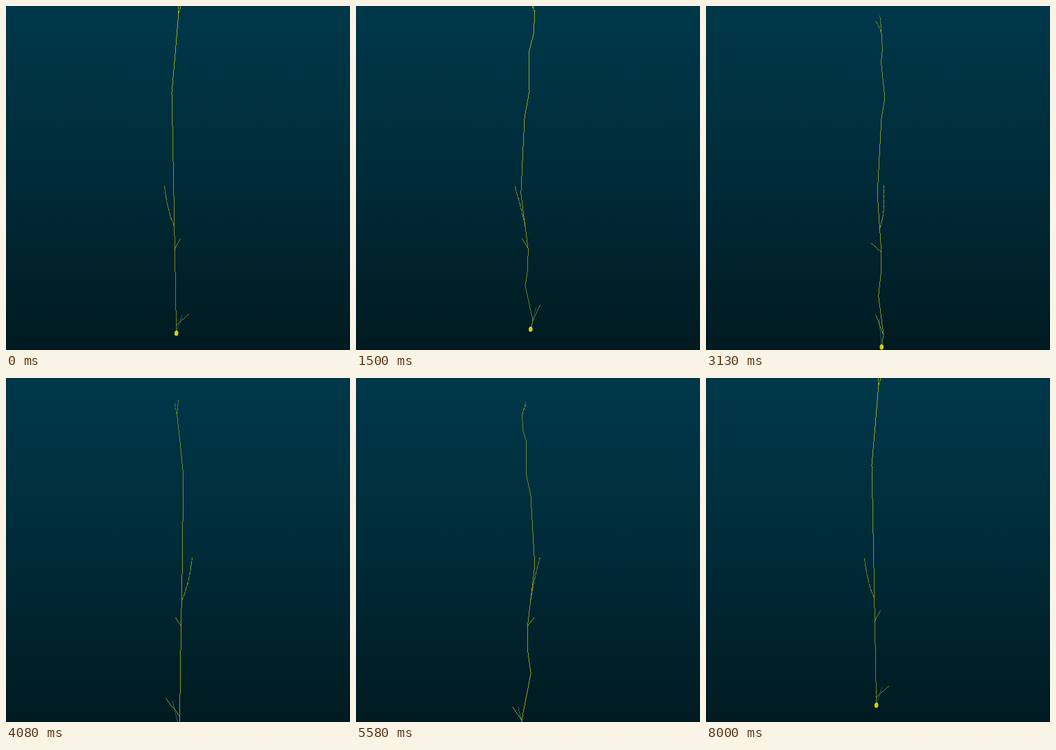
Animation, 500 px wide and 500 px high, one loop 8.04 s. Source, as an HTML page with a canvas:

```html
<!DOCTYPE html>
<html lang="en">
<head>
<meta charset="utf-8">
<title>Rotating neuron</title>
<style>
html, body { margin: 0; width: 100%; height: 100%; overflow: hidden; background: #00202a; }
canvas { display: block; width: 500px; height: 500px; }
</style>
</head>
<body>
<canvas id="stage" width="500" height="500"></canvas>
<script>
const ctx = document.getElementById('stage').getContext('2d');
const LOOP = 8040, STEPS = 192, STEP_MS = 1000 / 24;
const CX = 249.3, CY = 250, DEPTH = 0.002, CROWN = -118;
const OLIVE = [166, 184, 34], TEAL = [24, 120, 138];

// Where the trunk bends: height and depth.
const bends = [
  [243, 5.8], [227, 9.8], [168, -3], [138, 1.8], [106, 2.2], [22, -8.4],
  [-84, -1.7], [CROWN, 5.7], [-171, 3.4], [-192, 8.9], [-219, 9.5]
];

// The trunk leans slowly to one side, then swings back in the crown.
function side(h) {
  return -6.4 + 0.0168 * h + 0.11 * Math.max(0, CROWN - h);
}

function onTrunk(h) {
  const i = Math.max(1, bends.findIndex(b => b[0] <= h));
  const [h0, d0] = bends[i - 1], [h1, d1] = bends[i];
  return [side(h), d0 + (d1 - d0) * (h - h0) / (h1 - h0), h];
}

function curve(from, mid, tip, n = 8) {
  return Array.from({ length: n + 1 }, (_, i) => {
    const t = i / n, u = 1 - t;
    return from.map((v, k) => u * u * v + 2 * u * t * mid[k] + t * t * tip[k]);
  });
}

const soma = onTrunk(243), fork = onTrunk(-219);
const strands = [
  { points: [soma, [7, 11.2, 207]], color: TEAL },
  { points: bends.map(b => onTrunk(b[0])) },
  { points: curve(onTrunk(72), [-16, -2, 48], [-20, -12, 10]), gap: 8 },
  { points: [onTrunk(106), [4, -11.6, 92]] },
  { points: [onTrunk(227), [17, 15.5, 205]] },
  { points: [fork, [5, 1.5, -234]], gap: 6 },
  { points: [fork, [-1, 3.5, -242]], gap: 6 }
];

// Turns a point about the vertical axis; the axis itself tilts with the view.
function project([a, b, h], angle) {
  const c = Math.cos(angle), s = Math.sin(angle);
  const tilt = h * (0.00035 * c + 0.00033 * s);
  const scale = 1 - tilt - DEPTH * (a * s - b * c);
  return { x: CX + (a * c + b * s) * scale, y: CY + h * scale, scale };
}

// Crisp one-pixel line, brighter where it is nearer.
function strand({ points, color = OLIVE, gap = 0 }, angle) {
  const spots = points.map(p => project(p, angle));
  let count = 0;
  ctx.fillStyle = `rgb(${color})`;
  for (let i = 1; i < spots.length; i++) {
    const p = spots[i - 1], q = spots[i];
    const dx = q.x - p.x, dy = q.y - p.y;
    const n = Math.ceil(Math.max(Math.abs(dx), Math.abs(dy), 1));
    for (let k = 0; k < n; k++) {
      if (gap && ++count % gap === 0) continue;
      const t = k / n;
      const near = p.scale + (q.scale - p.scale) * t;
      ctx.globalAlpha = Math.min(1, 0.75 + 1.5 * (near - 1));
      ctx.fillRect(Math.round(p.x + dx * t), Math.round(p.y + dy * t), 1, 1);
    }
  }
  ctx.globalAlpha = 1;
}

const sky = ctx.createLinearGradient(0, 0, 0, 500);
sky.addColorStop(0, '#00384a');
sky.addColorStop(0.5, '#002b38');
sky.addColorStop(1, '#001a20');

function draw(angle) {
  ctx.fillStyle = sky;
  ctx.fillRect(0, 0, 500, 500);
  for (const s of strands) strand(s, angle);

  const { x, y } = project(soma, angle);
  ctx.fillStyle = '#d8d012';
  ctx.beginPath();
  ctx.ellipse(x + 0.5, y + 0.5, 2.8, 3.8, 0.1, 0, 2 * Math.PI);
  ctx.fill();
}

const start = performance.now();
function tick(now) {
  const t = Math.max(0, now - start) % LOOP;
  const step = Math.min(STEPS, Math.floor((t + 2) / STEP_MS));
  draw(2 * Math.PI * step / STEPS);
  requestAnimationFrame(tick);
}
draw(0);
requestAnimationFrame(tick);
</script>
</body>
</html>
```
